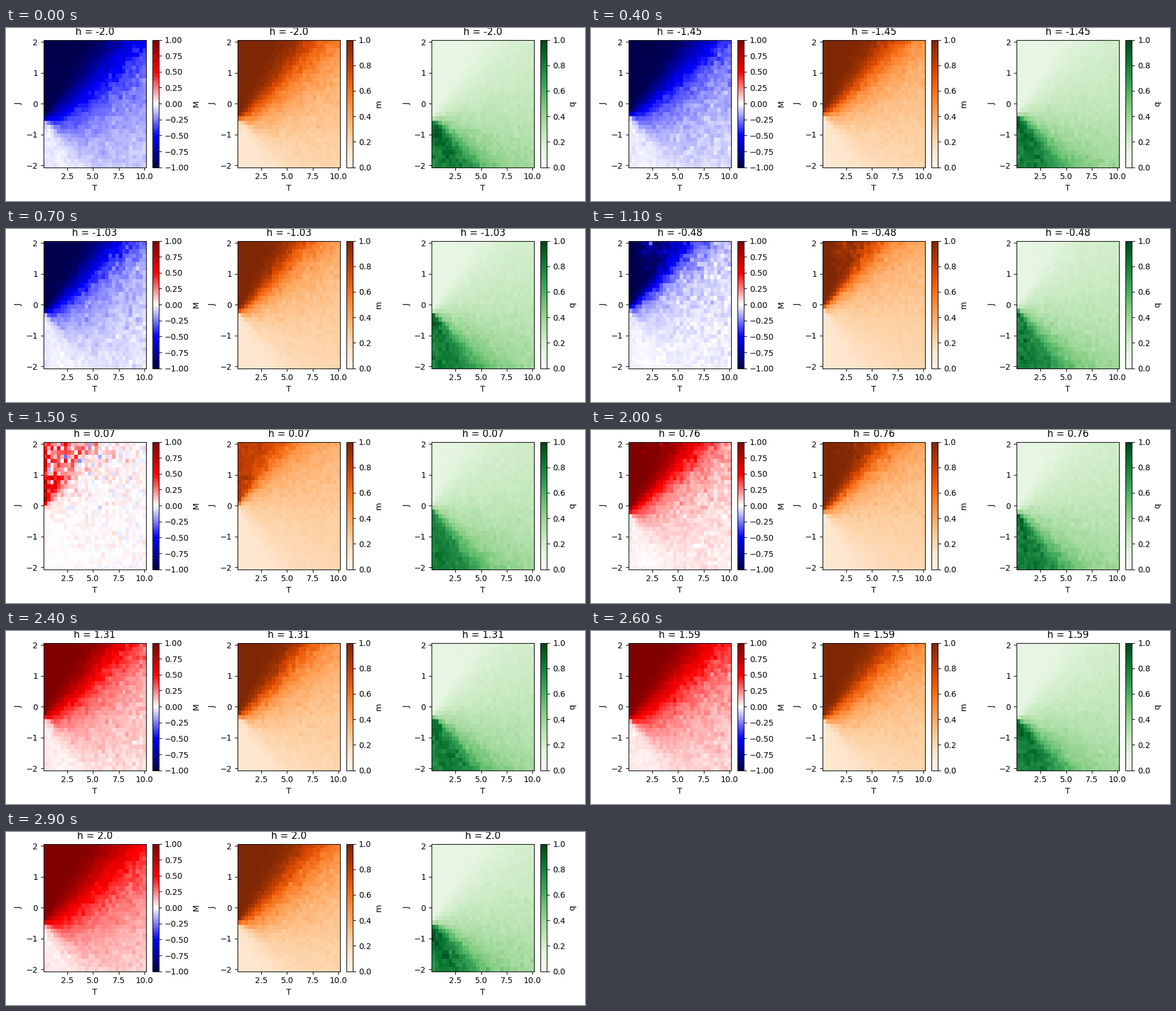
Animation of 1000 by 300 pixels, one loop 3000 ms. Source, as a matplotlib script:

```python
import numpy as np
import matplotlib.pyplot as plt
from matplotlib.animation import FuncAnimation

WIDTH, HEIGHT, DPI = 1000, 300, 100
FRAMES, INTERVAL = 30, 100
GRID = 30      # temperatures and couplings per map
SIZE = 30      # spins along one side of each lattice
SWEEPS = 8

plt.rcParams["font.family"] = "DejaVu Sans"

temps = np.linspace(1 / 3, 10, GRID)
couplings = np.linspace(-2, 2, GRID)
fields = np.linspace(-2, 2, FRAMES)
J, T = (a.ravel() for a in np.meshgrid(couplings, temps, indexing="ij"))

# Checkerboard split of the periodic lattice
site = np.arange(SIZE * SIZE).reshape(SIZE, SIZE)
parity = np.indices((SIZE, SIZE)).sum(axis=0) % 2
neighbours = [np.roll(site, step, axis) for axis in (0, 1) for step in (-1, 1)]
sublattices = [(site[parity == c], [n[parity == c] for n in neighbours])
               for c in (0, 1)]
stagger = (1 - 2 * parity)[:, :, None].astype(np.float32)

rng = np.random.default_rng(7)
noise_pool = rng.logistic(size=3_000_000).astype(np.float32)


def block_order(spins):
    """Mean absolute order over all 3 x 3 blocks."""
    for axis in (0, 1):
        spins = spins + np.roll(spins, 1, axis) + np.roll(spins, -1, axis)
    return np.abs(spins).mean(axis=(0, 1)) / 9


def simulate(field):
    """Quench random Ising lattices with heat-bath sweeps; return M, m, q."""
    pair = (2 * J / T).astype(np.float32)
    bias = (2 * field / T).astype(np.float32)
    spins = rng.choice(np.array([-1, 1], np.float32), (SIZE * SIZE, J.size))
    count = spins.size // 2
    for _ in range(SWEEPS):
        for sites, (a, b, c, d) in sublattices:
            drive = spins[a]
            drive += spins[b]
            drive += spins[c]
            drive += spins[d]
            drive *= pair
            drive += bias
            start = rng.integers(noise_pool.size - count)
            noise = noise_pool[start:start + count].reshape(drive.shape)
            spins[sites] = np.where(drive > noise, np.float32(1), np.float32(-1))
    spins = spins.reshape(SIZE, SIZE, -1)
    maps = spins.mean(axis=(0, 1)), block_order(spins), block_order(spins * stagger)
    return [values.reshape(GRID, GRID) for values in maps]


history = [simulate(h) for h in fields]

fig, axes = plt.subplots(1, 3, figsize=(WIDTH / DPI, HEIGHT / DPI), dpi=DPI)


def add_panel(ax, label, cmap, low, step):
    mesh = ax.pcolormesh(temps, couplings, np.zeros((GRID, GRID)),
                         cmap=cmap, vmin=low, vmax=1, shading="nearest")
    ax.set_xticks([2.5, 5, 7.5, 10])
    ax.set_yticks(range(-2, 3))
    ax.set_xlabel("T")
    ax.set_ylabel("J")
    bar = fig.colorbar(mesh, ax=ax, label=label)
    bar.set_ticks(np.arange(low, 1 + step / 2, step))
    return mesh, ax.set_title("")


panels = [add_panel(axes[0], "M", "seismic", -1, 0.25),
          add_panel(axes[1], "m", "Oranges", 0, 0.2),
          add_panel(axes[2], "q", "Greens", 0, 0.2)]
fig.tight_layout()  # titles are added later and may reach the top edge


def update(frame):
    for (mesh, title), values in zip(panels, history[frame]):
        mesh.set_array(values)
        title.set_text(f"h = {round(float(fields[frame]), 2)}")
    return [artist for panel in panels for artist in panel]


anim = FuncAnimation(fig, update, frames=FRAMES, interval=INTERVAL,
                     repeat=True, repeat_delay=0, blit=False)
plt.show()
```
